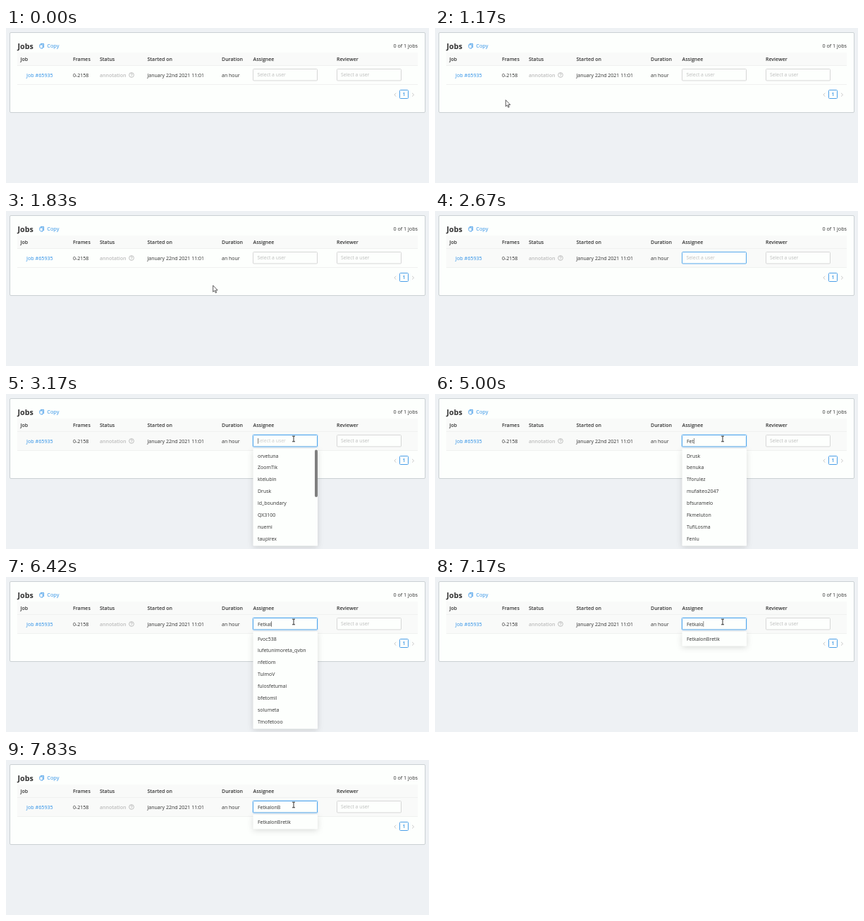
Recreate the animation shown at these times as an HTML page. Size 600 px wide and 221 px high, loop 8000 ms.

```html
<!DOCTYPE html>
<html lang="en">
<head>
<meta charset="utf-8">
<title>Jobs</title>
<style>
html, body { margin: 0; width: 100%; height: 100%; overflow: hidden; background: #eef1f4; }
svg { display: block; width: 600px; height: 221px; }
text { font: 7px "Open Sans", "Noto Sans", sans-serif; fill: #303030; white-space: pre; }
.bold, .bold text { font-weight: 600; }
.title { font-size: 10.7px; font-weight: 700; }
.link { fill: #2b8fe6; }
.hint { fill: #bcbcbc; }
.line { fill: none; stroke-width: 1; }
#drop { filter: drop-shadow(0 2px 4px rgba(0, 0, 0, .14)); transform-origin: 396px 78px; }
</style>
</head>
<body>
<svg viewBox="0 0 600 221">
  <rect x="5.5" y="6.5" width="589" height="114" rx="1.5" fill="#fdfffd" stroke="#cad0d3"/>
  <text class="title" x="16.5" y="29.5">Jobs</text>
  <g class="line" stroke="#2b8fe6" style="stroke-width:.8">
    <path d="M48.9 22.4H53.5V28"/>
    <path d="M47.9 23.8H52V29H49.4L47.9 27.5Z"/>
  </g>
  <text class="link" x="58.3" y="28" style="font-size:7.3px">Copy</text>
  <text x="584" y="28" text-anchor="end" style="font-size:7.2px">0 of 1 jobs</text>

  <rect x="16" y="35" width="568" height="18" fill="#f9faf9"/>
  <rect id="row" x="16" y="53" width="568" height="27" fill="#f9faf9"/>
  <path class="line" stroke="#f0f1f0" d="M16 53.5H584M16 80.5H584"/>
  <g id="head" class="bold"></g>
  <text class="link" x="29" y="69.5" style="font-size:7.2px">Job #65935</text>
  <text x="95" y="69.5">0-2158</text>
  <text class="bold hint" x="133" y="69.5">annotation</text>
  <circle class="line" cx="178" cy="67" r="3.4" stroke="#a8a8a8" style="stroke-width:.7"/>
  <path class="line" stroke="#a8a8a8" style="stroke-width:.7" d="M176.8 66.2C176.8 64.6 179.2 64.6 179.2 66C179.2 66.9 178 66.8 178 67.8M178 68.4V69.1"/>
  <text x="200.5" y="69.5">January 22nd 2021 11:01</text>
  <text x="306" y="69.5">an hour</text>

  <rect id="glow" class="line" x="349.5" y="57.5" width="93" height="18.5" rx="1.5" stroke="#1890ff" stroke-opacity=".16"/>
  <rect id="box" x="350.5" y="58.5" width="91" height="16.5" rx="1" fill="#fdfffd"/>
  <rect x="469.5" y="58.5" width="91" height="16.5" rx="1" fill="#fdfffd" stroke="#d6d6d6"/>
  <text id="hint" class="hint" x="356.5" y="69.4" style="font-size:6.85px">Select a user</text>
  <text class="hint" x="475" y="69.4" style="font-size:6.85px">Select a user</text>
  <text id="typed" x="357" y="69.5"></text>
  <rect id="caret" y="63" width=".6" height="8" fill="#444"/>

  <path class="line" stroke="#bdbdbd" style="stroke-width:.8" d="M553.4 92.8L550.8 95.2L553.4 97.6M576 92.8L578.6 95.2L576 97.6"/>
  <rect x="558.5" y="88.5" width="12" height="12" rx="1" fill="#fdfffd" stroke="#4a9fe8"/>
  <text class="link bold" x="564.5" y="97.3" text-anchor="middle">1</text>

  <g id="drop">
    <rect id="sheet" x="350.5" y="78" width="91.5" rx="1" fill="#fdfffd"/>
    <g id="list"></g>
    <rect id="bar" x="438" y="79.5" width="4" height="67.5" rx="2" fill="#7f7f7f"/>
  </g>
  <path id="arrow" d="M0 0V9.2L2.1 7.3L3.6 10.6L5 10L3.6 6.8H6.5Z" fill="#fff" stroke="#333" stroke-width=".8"/>
  <path id="beam" class="line" stroke="#333" d="M406 60.2H410M408 60V68M406 67.8H410"/>
</svg>
<script>
const LOOP = 8000, STEP = 1000 / 12, NAME = "FetkalonBretik";
const $ = id => document.getElementById(id);
const clamp = v => Math.max(0, Math.min(1, v));
const show = (id, on) => { $(id).style.display = on ? "" : "none"; };

const columns = { Job: 20.5, Frames: 95, Status: 133, "Started on": 200.5, Duration: 306, Assignee: 350.5, Reviewer: 469 };
const label = (s, x, y) => `<text x="${x}" y="${y}">${s}</text>`;
$("head").innerHTML = Object.entries(columns).map(([s, x]) => label(s, x, 46.5)).join("");

// [start, options]
const lists = [
  [0, "orvetuna ZoomTik ktelubin Drusk ld_boundary QX3100 nuemi taupirex"],
  [4830, "Drusk benuka Tforulez mufaiteo2047 bfsuramelo Fkmeluton TufiLosma Fenlu"],
  [5420, "Fvoc538 lufetunimoreta_qvbn nfetlom TulmoV fulosfetumai bfetomil solumeta Tmofetooo"],
  [6580, NAME]
].map(([at, names]) => [at, names.split(" ")]);

const keys = [4000, 4670, 4830, 5750, 5920, 6080, 7170, 7420, 7750];

// [time, x, y]
const path = [[1000, 24, 98], [1333, 172, 107], [1417, 172, 107], [1833, 292, 106], [2083, 370, 112], [2250, 407, 85]];

function along(t) {
  let i = 0;
  while (i < path.length - 2 && t >= path[i + 1][0]) i++;
  const [a, b] = [path[i], path[i + 1]];
  const k = clamp((t - a[0]) / (b[0] - a[0]));
  return [1, 2].map(n => a[n] + (b[n] - a[n]) * k);
}

let current;
function setList(names) {
  if (names === current) return;
  current = names;
  $("list").innerHTML = names.map((s, i) => label(s, 357, 90.6 + i * 16.86)).join("");
  $("sheet").setAttribute("height", names.length > 1 ? 138.5 : 20.5);
}

function draw(now) {
  const t = Math.floor((now % LOOP + 5) / STEP) * STEP + 5;
  const hover = clamp((t - 2330) / 250), open = clamp((t - 2840) / 300);
  const ease = 1 - (1 - open) ** 3;

  show("arrow", t >= 1000 && t < 2330);
  $("arrow").setAttribute("transform", `translate(${along(t)})`);
  show("beam", t >= 2750);

  const mix = (a, b) => Math.round(a + (b - a) * hover);
  $("box").setAttribute("stroke", `rgb(${mix(214, 84)},${mix(214, 168)},${mix(214, 236)})`);
  $("row").style.opacity = hover;
  $("glow").style.opacity = open;

  show("drop", open > 0);
  $("drop").style.opacity = ease;
  $("drop").style.transform = `scaleY(${.8 + .2 * ease})`;
  $("bar").style.opacity = 1 - clamp((t - 3590) / 250);
  setList(lists.filter(l => t >= l[0]).pop()[1]);

  const n = keys.filter(k => t >= k).length;
  $("typed").textContent = NAME.slice(0, n);
  $("hint").style.opacity = n ? 0 : 1 - .2 * open;
  show("caret", t >= 3000 && t < 7750);
  $("caret").setAttribute("x", 357 + (n ? $("typed").getComputedTextLength() : 0));
}

const start = performance.now();
function tick() {
  draw(performance.now() - start);
  requestAnimationFrame(tick);
}
tick();
</script>
</body>
</html>
```
